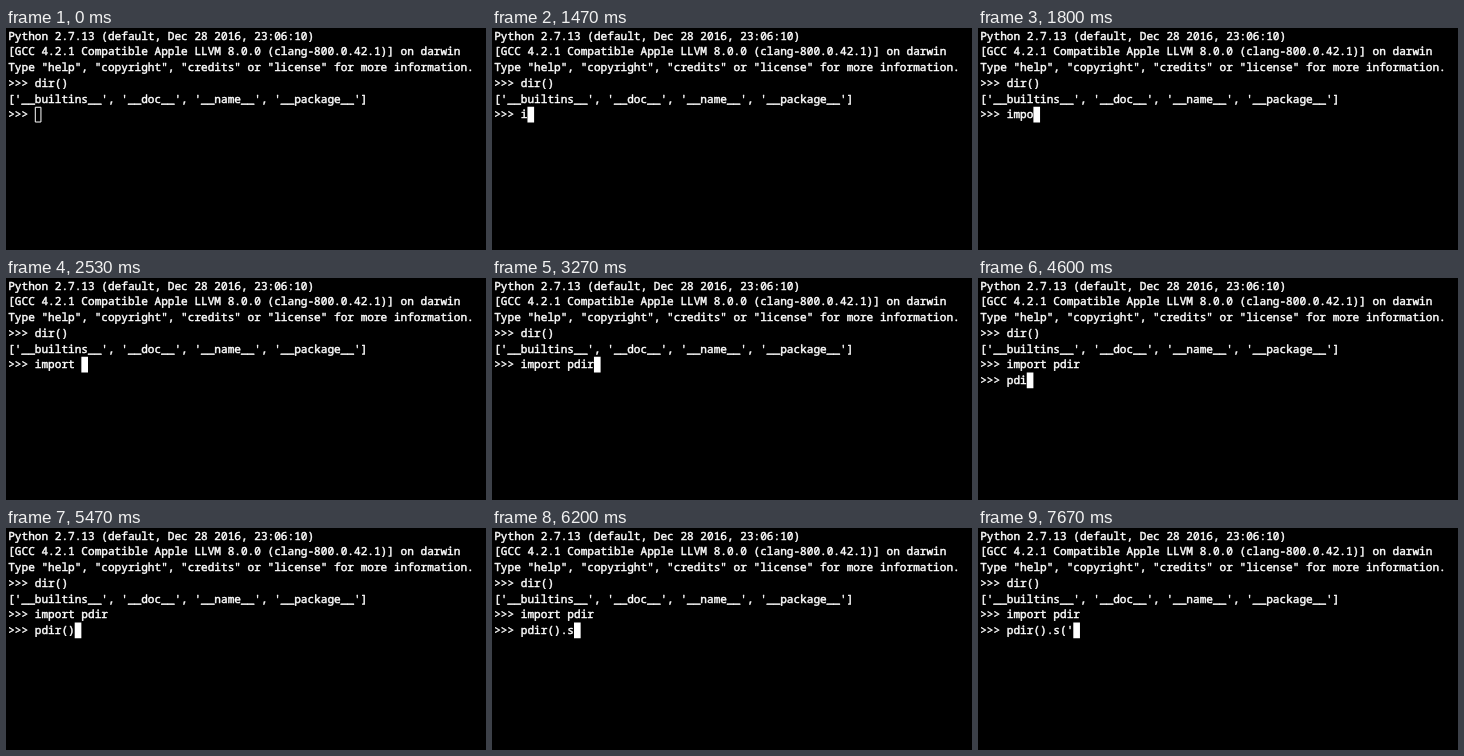
Write an HTML page with a canvas that moves like this. It is 480 by 222 pixels and loops after 8000 ms.

```html
<!DOCTYPE html>
<html lang="en">
<head>
<meta charset="utf-8">
<title>Python session</title>
<style>
html, body { margin: 0; width: 100%; height: 100%; overflow: hidden; background: #000; }
canvas { display: block; }
</style>
</head>
<body>
<canvas id="screen" width="480" height="222"></canvas>
<script>
const ctx = document.getElementById('screen').getContext('2d');
const LOOP = 8000, FOCUS_AT = 730;
const LEFT = 2.2, CELL = 6.65, LINE = 15.75, BASELINE = 11.5;

const HISTORY = [
  'Python 2.7.13 (default, Dec 28 2016, 23:06:10)',
  '[GCC 4.2.1 Compatible Apple LLVM 8.0.0 (clang-800.0.42.1)] on darwin',
  'Type "help", "copyright", "credits" or "license" for more information.',
  '>>> dir()',
  "['__builtins__', '__doc__', '__name__', '__package__']",
  '>>> '
].join('\n');

// Each entry: time in ms, text that appears then
const TYPED = [
  [1470, 'i'], [1530, 'm'], [1670, 'p'], [1800, 'o'], [2070, 'r'], [2200, 't'], [2530, ' '],
  [2930, 'p'], [3070, 'd'], [3200, 'i'], [3270, 'r'],
  [3730, '\n'], [3800, '>>> '],
  [4400, 'p'], [4530, 'd'], [4600, 'i'], [4800, 'r'], [5200, '('], [5470, ')'],
  [5930, '.'], [6200, 's'], [7130, '('], [7670, "'"]
];

const cellX = col => LEFT + col * CELL;

// A thin outline gives the regular face a medium weight
function drawChar(char, col, row) {
  const x = cellX(col), y = row * LINE + BASELINE;
  ctx.lineWidth = 0.45;
  ctx.fillText(char, x, y);
  ctx.strokeText(char, x, y);
}

function drawCursor(col, row, focused) {
  const x = cellX(col), y = row * LINE;
  ctx.lineWidth = 1;
  if (focused) ctx.fillRect(x, y, CELL, LINE);
  else ctx.strokeRect(x + 0.5, y + 0.5, CELL - 1, LINE - 1);
}

function draw(t) {
  const typed = TYPED.filter(([at]) => t >= at).map(([, text]) => text).join('');
  const lines = (HISTORY + typed).split('\n');

  ctx.fillStyle = '#000';
  ctx.fillRect(0, 0, 480, 222);
  ctx.fillStyle = ctx.strokeStyle = '#fff';
  ctx.lineJoin = 'round';
  ctx.font = '11.1px "Noto Sans Mono", "DejaVu Sans Mono", monospace';
  ctx.textRendering = 'geometricPrecision';

  lines.forEach((line, row) => [...line].forEach((char, col) => drawChar(char, col, row)));
  drawCursor(lines.at(-1).length, lines.length - 1, t >= FOCUS_AT);
}

const start = performance.now();
function frame() {
  draw((performance.now() - start) % LOOP);
  requestAnimationFrame(frame);
}
frame();
</script>
</body>
</html>
```
